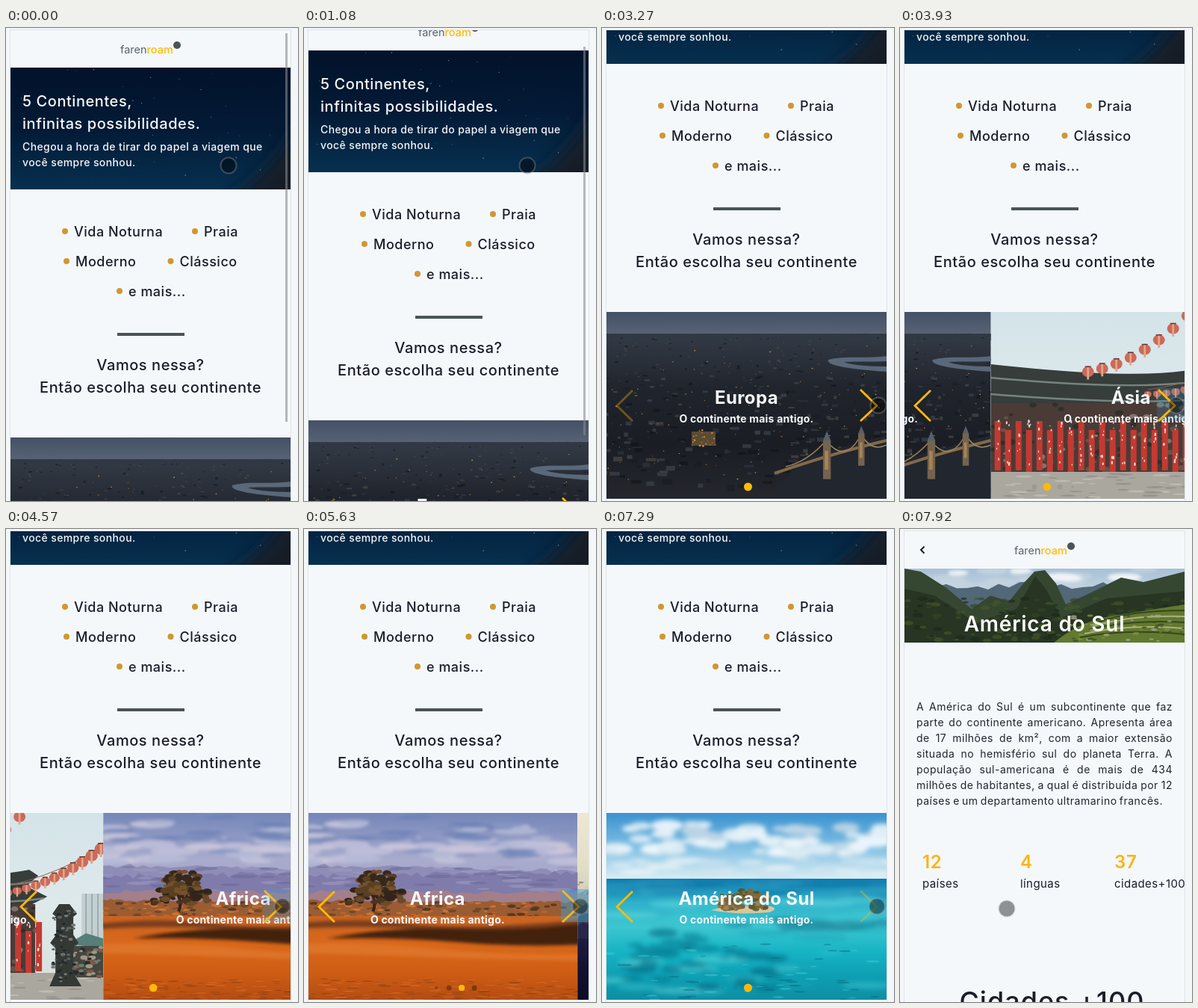
An HTML page for the animation above (8000 ms loop, 391x633 px).

```html
<!DOCTYPE html>
<html lang="pt-BR">
<head>
<meta charset="utf-8">
<title>Continentes</title>
<style>
html, body { margin: 0; width: 100%; height: 100%; overflow: hidden; background: #f4f7f9; }
svg { display: block; }
text, .copy { font-family: Inter, "Open Sans", sans-serif; }
.copy { font-size: 14px; line-height: 21px; color: #22242e; letter-spacing: .5px; word-spacing: -1.2px; }
.copy div { white-space: nowrap; text-align: justify; text-align-last: justify; }
.copy div:last-child { text-align-last: left; }
</style>
</head>
<body>
<svg id="stage" width="391" height="633" viewBox="0 0 391 633"></svg>
<script>
const LOOP = 8000, W = 375;
const INK = '#1b1d2a', GOLD = '#ffba08', SLATE = '#4a5357', PAGE = '#f5f8fa';

// Instants at which the screen refreshes.
const TICKS = [0, 290, 410, 530, 1080, 1200, 1350, 1500, 1770, 1890, 2040, 2190, 2600, 2720, 2850, 2970,
  3120, 3270, 3810, 3930, 4050, 4170, 4450, 4570, 4690, 4810, 5630, 5760, 5880, 6000, 6400, 6520, 6640,
  6760, 7290, 7410, 7540, 7660, 7800, 7920];
const SLIDE_STARTS = [3800, 4445, 5612, 6378];
const CURSOR = [[290, 298, 184], [530, 299, 184], [2040, 299, 184], [2190, 300, 184], [2500, 300, 184],
  [2970, 378, 521], [3120, 376, 507], [3270, 370, 505], [7270, 370, 505], [7660, 143, 508]];

let seed = 7;
const rnd = (a = 0, b = 1) => {
  seed = (seed * 16807) % 2147483647;
  return a + (b - a) * seed / 2147483647;
};
const pick = list => list[Math.floor(rnd(0, list.length))];
const clamp = v => Math.max(0, Math.min(1, v));

// ---- drawing helpers ----
const rect = (x, y, w, h, fill, more = '') =>
  `<rect x="${x}" y="${y}" width="${w}" height="${h}" fill="${fill}" ${more}/>`;
const dot = (x, y, r, fill, more = '') => `<circle cx="${x}" cy="${y}" r="${r}" fill="${fill}" ${more}/>`;
const shape = (d, fill, more = '') => `<path d="${d}" fill="${fill}" ${more}/>`;
const line = (d, stroke, width, more = '') =>
  `<path d="${d}" fill="none" stroke="${stroke}" stroke-width="${width}" ${more}/>`;
const group = (id, body) => `<g id="${id}">${body}</g>`;
const blur = (radius, body) => `<g filter="url(#blur${radius})">${body}</g>`;
const blurFilter = radius =>
  `<filter id="blur${radius}" x="-20%" y="-30%" width="140%" height="160%"><feGaussianBlur stdDeviation="${radius}"/></filter>`;

const label = (x, y, text, size, weight = 400, fill = INK, anchor = 'start') =>
  `<text x="${x}" y="${y}" font-size="${size}" font-weight="${weight}" fill="${fill}" text-anchor="${anchor}" ` +
  `letter-spacing="${weight < 700 ? .028 : .015}em">${text}</text>`;

let gradients = 0;
const shade = (x, y, w, h, ...colors) => {
  const id = 'shade' + gradients++;
  const stops = colors.map((c, i) => `<stop offset="${i / (colors.length - 1)}" stop-color="${c}"/>`).join('');
  return `<linearGradient id="${id}" x2="0" y2="1">${stops}</linearGradient>` + rect(x, y, w, h, `url(#${id})`);
};

const scatter = (n, [x0, x1], [y0, y1], rx, ry, colors, opacity = 1) => {
  let out = '';
  for (let i = 0; i < n; i++) {
    const k = rnd(.4, 1);
    out += `<ellipse cx="${rnd(x0, x1).toFixed(1)}" cy="${rnd(y0, y1).toFixed(1)}" rx="${(rx * k).toFixed(1)}" ` +
      `ry="${(ry * k).toFixed(1)}" fill="${pick(colors)}"/>`;
  }
  return `<g opacity="${opacity}">${out}</g>`;
};

const blocks = (n, y0, y1, colors) => {
  let out = '';
  for (let i = 0; i < n; i++) {
    const depth = rnd() ** 1.4, size = 2 + depth * 7;
    out += rect(rnd(-5, W).toFixed(1), (y0 + depth * (y1 - y0)).toFixed(1),
      (size * rnd(.6, 1.8)).toFixed(1), (size * rnd(.3, .9)).toFixed(1), pick(colors));
  }
  return `<g opacity=".7">${out}</g>`;
};

const ridge = (y, slope, rough, bottom, fill, step = 7) => {
  let d = `M0,${bottom}`;
  for (let x = 0; x <= W + step; x += step) d += `L${x},${(y + slope * x / W + rnd(-rough, rough)).toFixed(1)}`;
  return shape(d + `V${bottom}Z`, fill);
};

// ---- pictures ----
const nightSky = () =>
  shade(0, 0, W, 163, '#02122a', '#031a36', '#06304f') +
  blur(12, shape('M400,50V190H270Q350,150 400,50Z', '#171d28')) +
  scatter(45, [0, W], [0, 155], .8, .8, ['#8fa6b8', '#355a78'], .7);

const europe = () => {
  const tower = (x, y, s) => rect(x, y, 9 * s, 45 * s, '#74634e') +
    shape(`M${x},${y}l${4.5 * s},${-11 * s}l${4.5 * s},${11 * s}z`, '#556070') +
    rect(x + 2 * s, y + 12 * s, 4 * s, 22 * s, '#a98453');
  return shade(0, 0, W, 32, '#435066', '#596475') +
    shade(0, 29, W, 221, '#343b46', '#20242c', '#1a1d24', '#25272d') +
    ridge(30, 0, 1.5, 38, '#303844', 4) +
    blocks(380, 34, 235, ['#3d434b', '#12151b', '#4b4946', '#2d333d', '#191d24']) +
    scatter(130, [0, W], [45, 225], 1.1, .9, ['#c98a3c', '#b5783a', '#d6a868'], .75) +
    shape('M375,59C345,63 318,58 297,64C293,72 330,77 375,80V73C345,73 325,70 318,67C335,66 355,67 375,66Z', '#59687a') +
    shape('M220,250L262,196L375,165V250Z', '#22262e') +
    rect(114, 160, 32, 19, '#5b4a34') + scatter(26, [114, 148], [158, 180], 1.5, 1.5, ['#d08d3a', '#8a6335']) +
    line('M225,216Q300,190 375,172', '#826a4a', 4) +
    line('M240,207Q270,200 294,172M294,172Q320,205 341,164M341,164Q355,188 375,178', '#9d8460', 1.5) +
    tower(290, 172, 1.15) + tower(337, 163, .95);
};

const asia = () => {
  const lantern = (x, y, r) => `<ellipse cx="${x}" cy="${y}" rx="${r}" ry="${r * .9}" fill="#cb6a57"/>` +
    line(`M${x},${y - r}V${y + r * 1.3}`, '#e3a58c', r * .35) +
    line(`M${x - r * .5},${y - r * .85}H${x + r * .5}`, '#65342f', 1.5);
  let lanterns = '';
  for (let i = 0; i < 14; i++) {
    const u = i / 13;
    lanterns += lantern(210 + 162 * u, 110 - 62 * u * u, 5 + 3.5 * u);
    if (i < 8) lanterns += lantern(130 + 19 * i, 80 - 1.1 * i * i - 3 * i, 8);
  }
  let banners = '';
  for (let x = 5; x < 295; x += 14)
    banners += rect(x, 140 + (x % 4) * 6, 8, 66, '#c33a32') +
      scatter(6, [x + 2, x + 6], [146, 205], 1.3, 2.5, ['#f0cdb8', '#e8e2da']);
  return shade(0, 0, W, 250, '#d3e4e9', '#dfe9eb', '#d8dedc') +
    shape('M0,70Q200,92 276,76L288,84L272,98L300,112L280,122V215H0Z', '#363d3a') +
    line('M0,88Q200,106 282,92M0,110Q220,127 296,114', '#77837e', 2.5) +
    rect(0, 122, 284, 92, '#4a3b37') + scatter(80, [0, 292], [124, 212], 6, 4, ['#2b2c2a', '#6c5a50', '#8c8478'], .8) +
    banners + rect(0, 214, W, 36, '#aaa79f') +
    scatter(60, [0, W], [216, 250], 12, 1.5, ['#8d8c85', '#c6c3ba'], .7) +
    line('M210,104Q300,92 375,44', '#8a5f57', 1) + lanterns +
    rect(346, 108, 29, 60, '#c3cfd0') + line('M352,108V168M360,108V168M368,108V168', '#8fa3a6', 1.5) +
    shape('M326,176L352,161L375,168V180Z', '#557f78') +
    rect(330, 178, 45, 42, '#45463f') + scatter(45, [328, W], [180, 222], 5, 3, ['#262d28', '#7b5b48', '#6f7e72', '#9c988a']) +
    shape('M307,135L316,122H330L340,135L335,139V163L342,174L335,181V214L346,232H303L311,214V181L304,174L312,163V139Z', '#343936') +
    scatter(60, [308, 338], [130, 228], 3, 2, ['#20262a', '#596260', '#757b76']);
};

const africa = () =>
  shade(0, 0, W, 125, '#7486b8', '#a9abcd', '#a09fc2') +
  blur(2, scatter(45, [0, W], [12, 66], 34, 6, ['#c6c5dc', '#d6cfdf', '#b9bfd9'], .75) +
    scatter(26, [0, W], [0, 60], 30, 3.5, ['#6a80b6', '#7d8fbe'], .8)) +
  ridge(70, 8, 3, 130, '#8f8db7', 9) + ridge(84, -4, 4, 130, '#7f7cab', 8) +
  scatter(45, [0, W], [72, 104], 18, 2.5, ['#9d9ac0', '#6c6b9c'], .6) +
  ridge(106, 0, 3, 130, '#a27f8b', 10) + ridge(117, 2, 2, 150, '#9a5c33', 5) +
  scatter(110, [0, W], [119, 139], 6, 2.2, ['#4d3320', '#c0662a', '#6c4529', '#d07a36'], .85) +
  shade(0, 138, W, 112, '#c96424', '#d9671a', '#cf5d14', '#b34c12') +
  blur(2, shape('M-20,150Q70,138 150,148T390,142V152Q250,160 160,155T-20,156Z', '#7a3c1b') +
    shape('M40,168Q120,152 220,155T390,146V176Q300,180 215,173Q130,166 40,168Z', '#43230f') +
    shape('M-10,176Q90,172 190,182T390,188V198Q250,196 150,192T-10,188Z', '#e27b30', 'opacity=".7"')) +
  scatter(150, [0, W], [222, 252], 9, .8, ['#7d3a12', '#e0752a'], .55) +
  line('M101,132Q107,116 96,104M103,122Q113,110 122,98', '#38241a', 4) +
  scatter(55, [68, 142], [102, 121], 7, 4, ['#4b3520', '#33241a', '#6d4b28']) +
  scatter(70, [82, 128], [78, 108], 7, 4.5, ['#5a4022', '#38281a', '#75512a']);

const northAmerica = () =>
  shade(0, 0, W, 140, '#eee8d3', '#e3dec6', '#c8c4ac') +
  shape('M0,108L80,78L160,88L240,70L278,57L298,46L313,38L326,48L338,47L352,61L375,76V180H0Z', '#a9a694') +
  scatter(260, [255, W], [78, 128], 4, 1.6, ['#666761', '#cfcab5', '#ddd8c4', '#77766d'], .8) +
  scatter(120, [286, 345], [56, 84], 3.5, 2, ['#e4dfca', '#85837a', '#d8d3bd'], .8) +
  scatter(120, [0, 250], [92, 128], 5, 2, ['#77766d', '#cfcab5'], .7) +
  ridge(122, -4, 4, 250, '#65646a', 6) + ridge(136, 8, 5, 250, '#3e3e52', 6) + ridge(150, 8, 4, 250, '#27274a', 7) +
  shade(0, 168, W, 82, '#1e1d40', '#12112f', '#0d0c27') +
  line('M262,226L310,250', '#8d8c9c', 1.5) + line('M375,176Q320,183 280,200', '#3f3c5d', 2);

const southAmerica = () =>
  shade(0, 0, W, 88, '#3a92cf', '#7cbde3', '#d9edf3') +
  blur(3, scatter(60, [0, W], [14, 54], 22, 8, ['#ffffff', '#e8f1f6', '#f6f9fb', '#c9dbe8'], .85) +
    scatter(30, [0, W], [62, 84], 30, 4, ['#f1f8f9', '#cfe4ef'], .8)) +
  shade(0, 88, W, 162, '#0f7aae', '#2fb2cb', '#3dc6d0', '#16b4c5', '#0e9fb4', '#0d8ea5') +
  blur(3, scatter(34, [0, W], [92, 110], 50, 2.5, ['#0b6d9f', '#3aa9c8'], .6) +
    scatter(36, [0, W], [112, 240], 40, 5, ['#64dcdb', '#1aa5b8', '#3ccdd3'], .5) +
    scatter(40, [20, 230], [160, 235], 20, 6, ['#08627c', '#0b7790'], .55) +
    scatter(16, [160, W], [142, 158], 32, 4, ['#0c6e88', '#117f98'], .6)) +
  scatter(60, [0, W], [175, 250], 10, 1.5, ['#075a72', '#53d8da'], .4) +
  shape('M140,130Q165,122 220,125Q231,128 218,133Q175,137 140,130Z', '#d8c79d') +
  scatter(80, [150, 216], [109, 129], 5, 3.5, ['#5d5a35', '#8a693f', '#6b6a3c', '#a5804f']) +
  scatter(20, [166, 204], [103, 112], 5, 3, ['#55552f', '#7d6a3c']);

const andes = () =>
  shade(0, 0, W, 60, '#a7c0d6', '#e1e8ec') +
  blur(2, scatter(25, [0, W], [0, 24], 24, 6, ['#fff', '#c6d5e0'], .8)) +
  ridge(23, -2, 6, 99, '#526878', 14) +
  shape('M0,0L22,4L55,25L90,54L115,36L140,44L160,19L174,4L188,2L203,20L216,48L250,32L290,12L320,18L375,4V99H0Z', '#354731') +
  shape('M0,27L40,36L95,72L150,54L175,10L190,28L210,66L270,40L375,30V99H0Z', '#273522') +
  scatter(160, [0, W], [40, 96], 7, 3, ['#1b281c', '#465729', '#344427'], .65) +
  shape('M200,99Q235,70 280,63L375,48V99Z', '#62792f') +
  [0, 1, 2, 3, 4].map(i => line(`M${235 + i * 6},${92 - i * 5}Q300,${80 - i * 6} 375,${88 - i * 8}`, i % 2 ? '#adb17e' : '#354720', 2)).join('') +
  scatter(60, [220, W], [62, 97], 5, 2, ['#a4a58b', '#3b4e23', '#7e9141'], .8);

// ---- pages ----
const logo = () =>
  `<text x="153" y="34" font-size="14.5">` +
  `<tspan fill="#59636b">faren</tspan><tspan fill="${GOLD}" font-weight="500">roam</tspan></text>` + dot(229, 23, 5, SLATE);

const picture = (x, y, h, body) => `<svg x="${x}" y="${y}" width="${W}" height="${h}">${body}</svg>`;

const feature = (x, y, text) => dot(x, y, 4, '#d19730') + label(x + 12, y + 7, text, 18, 500);

const slides = [['Europa', europe], ['Ásia', asia], ['Africa', africa],
  ['América do Norte', northAmerica], ['América do Sul', southAmerica]]
  .map(([name, draw], i) => picture(i * W, 0, 250, draw() +
    label(187.5, 123, name, 24, 700, '#f7f8fa', 'middle') +
    label(187.5, 148, 'O continente mais antigo.', 14, 700, '#f7f8fa', 'middle'))).join('');

const carousel = picture(6, 548, 250,
  group('track', slides) +
  group('bullets', [0, 1, 2, 3, 4].map(() => dot(0, 234, 0, '#000')).join('')) +
  rect(338, 102, 37, 44, '#3f9fd0', 'id="flash"') +
  line('M35,105L14,125.5L35,146', GOLD, 2.8, 'id="prev"') +
  line('M340,104L362,125.5L340,146', GOLD, 2.8, 'id="next"'));

const home = logo() + picture(6, 53, 163, nightSky()) +
  label(22, 105, '5 Continentes,', 20, 500, PAGE) +
  label(22, 135, 'infinitas possibilidades.', 20, 500, PAGE) +
  label(22, 164, 'Chegou a hora de tirar do papel a viagem que', 14, 500, PAGE) +
  label(22, 185, 'você sempre sonhou.', 14, 500, PAGE) +
  feature(79, 272, 'Vida Noturna') + feature(253, 272, 'Praia') +
  feature(81, 312, 'Moderno') + feature(220.5, 312, 'Clássico') + feature(152, 352, 'e mais...') +
  rect(149, 408, 90, 4, SLATE) +
  label(193.5, 458, 'Vamos nessa?', 20, 500, INK, 'middle') +
  label(193.5, 488, 'Então escolha seu continente', 20, 500, INK, 'middle') + carousel;

const copy = ['A América do Sul é um subcontinente que faz', 'parte do continente americano. Apresenta área',
  'de 17 milhões de km², com a maior extensão', 'situada no hemisfério sul do planeta Terra. A',
  'população sul-americana é de mais de 434', 'milhões de habitantes, a qual é distribuída por 12',
  'países e um departamento ultramarino francês.'].map(s => `<div>${s}</div>`).join('');

const stat = (x, value, name) => label(x, 454, value, 24, 600, '#fbb416') + label(x, 480, name, 15);

const detail = rect(6, 3, W, 630, PAGE) + logo() + line('M32.5,23.5L28,28L32.5,32.5', INK, 2) +
  group('banner', picture(6, 53, 99, andes())) +
  label(193.5, 137, 'América do Sul', 28, 600, '#fff', 'middle') +
  `<foreignObject x="22" y="227" width="343" height="150"><div class="copy">${copy}</div></foreignObject>` +
  stat(30, '12', 'países') + stat(161, '4', 'línguas') + stat(287, '37', 'cidades+100') +
  label(203.5, 645, 'Cidades +100', 36, 500, INK, 'middle');

const $ = id => document.getElementById(id);
$('stage').innerHTML =
  `<clipPath id="screen">${rect(6, 3, W, 630, '#000')}</clipPath>` + [2, 3, 12].map(blurFilter).join('') +
  rect(5.5, 2.5, 376, 640, PAGE, 'stroke="#dfe4e7"') +
  `<g clip-path="url(#screen)">${group('home', home)}${group('detail', detail)}` +
  `${rect(374, 7, 3, 520, '#858a8e', 'id="scrollbar"')}</g>` +
  group('cursor', dot(0, 0, 10.5, '#000', 'fill-opacity=".42" stroke="#9a9fa3" stroke-opacity=".35" stroke-width="2"'));

// ---- motion ----
const ease = u => {
  u = clamp(u);
  let lo = 0, hi = 1;
  for (let i = 0; i < 24; i++) {
    const s = (lo + hi) / 2;
    if (.75 * s * (1 - s) + s ** 3 < u) lo = s; else hi = s;
  }
  return .3 * lo * (1 - lo) ** 2 + 3 * lo * lo * (1 - lo) + lo ** 3;
};
const slidePosition = (t, duration) => SLIDE_STARTS.reduce((sum, s) => sum + ease((t - s) / duration), 0);

const cursorAt = t => {
  const i = CURSOR.findIndex(k => k[0] > t);
  if (i === 0) return CURSOR[0].slice(1);
  if (i < 0) return CURSOR[CURSOR.length - 1].slice(1);
  const [a, b] = [CURSOR[i - 1], CURSOR[i]], u = (t - a[0]) / (b[0] - a[0]);
  const k = u * u * (3 - 2 * u);
  return [a[1] + (b[1] - a[1]) * k, a[2] + (b[2] - a[2]) * k];
};

const set = (node, attrs) => { for (const k in attrs) node.setAttribute(k, attrs[k]); };

function update(t) {
  const scroll = 168 * (1 - (1 - clamp((t - 1048) / 452)) ** 2);
  set($('home'), { transform: `translate(0 ${-scroll})` });

  const bar = t < 1048 ? 1 - clamp((t - 170) / 360) : 1 - clamp((t - 1650) / 390);
  set($('scrollbar'), { y: 7 + scroll * .785, opacity: .6 * bar });

  const active = SLIDE_STARTS.filter(s => t >= s).length;
  set($('track'), { transform: `translate(${-W * slidePosition(t, 320)} 0)` });
  const center = slidePosition(t, 200), moving = active - center;
  [...$('bullets').children].forEach((node, i) => set(node, {
    cx: 189.5 + 17 * (i - center),
    r: i === active ? 5.5 - 1.5 * moving : [0, 3.5, 1.8][Math.abs(i - active)] || 0,
    fill: i === active ? GOLD : '#000',
    opacity: i === active ? 1 : .05 + .3 * moving
  }));
  const sinceTap = active ? t - SLIDE_STARTS[active - 1] : LOOP;
  set($('flash'), { opacity: .5 * (1 - clamp(sinceTap / 230)) });
  set($('prev'), { opacity: active ? 1 : .35 });
  set($('next'), { opacity: active < 4 ? 1 : .35 });

  set($('detail'), { visibility: t >= 7540 ? 'visible' : 'hidden' });
  set($('banner'), { visibility: t >= 7800 ? 'visible' : 'hidden' });
  set($('cursor'), { transform: `translate(${cursorAt(t)})` });
}

const start = performance.now();
function frame() {
  const now = (performance.now() - start) % LOOP;
  update(TICKS.filter(t => t <= now).pop());
  requestAnimationFrame(frame);
}
update(0);
frame();
</script>
</body>
</html>
```
